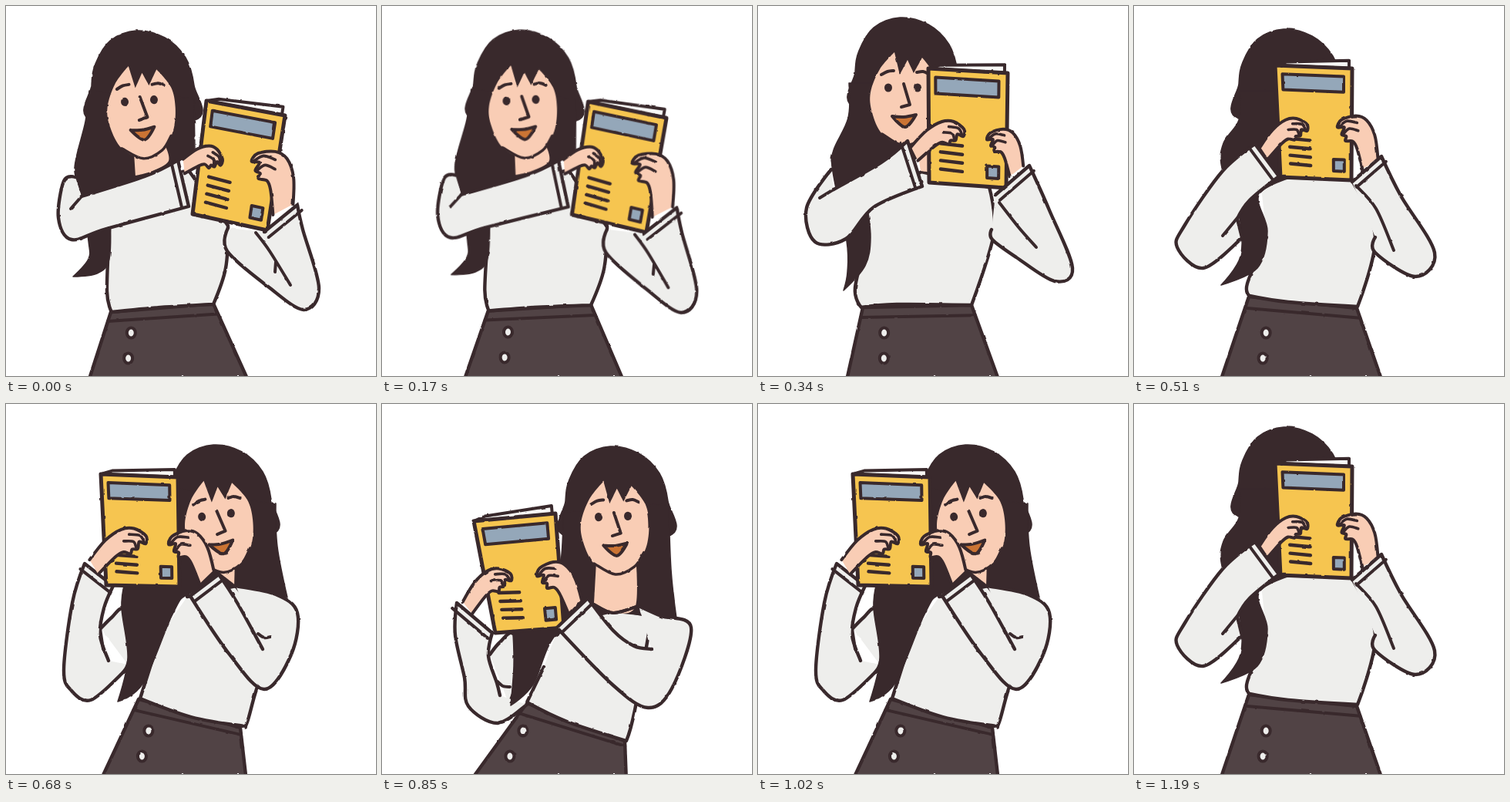
These frames come from a looping animation (480 by 480 pixels, 1360 ms). An HTML page:

```html
<!DOCTYPE html>
<html lang="en">
<head>
<meta charset="utf-8">
<title>Woman with a book</title>
<style>
html, body { margin: 0; width: 100%; height: 100%; overflow: hidden; background: #fff; }
svg { display: block; width: 100vw; height: 100vh; }
path { stroke-linecap: round; stroke-linejoin: round; }
</style>
</head>
<body>
<svg viewBox="0 0 480 480">
  <filter id="rough" filterUnits="userSpaceOnUse" x="0" y="0" width="480" height="480" color-interpolation-filters="sRGB">
    <feTurbulence type="fractalNoise" baseFrequency=".12" seed="4"/>
    <feDisplacementMap in="SourceGraphic" scale="2.4" xChannelSelector="R" yChannelSelector="G"/>
  </filter>
  <g id="scene" filter="url(#rough)"></g>
</svg>
<script>
const INK = '#39292c', SKIN = '#f9cdb5', CLOTH = '#eeeeec', SKIRT = '#514345',
      GOLD = '#f6c550', BLUE = '#94a7b9', LIPS = '#cb7434', PAPER = '#f7f7f5', FRAME = 170;

const mix = (a, b, t) => a.map((v, k) => v + (b[k] - v) * t);
const corner = p => p.map(v => v.toFixed(1)) + '!';

// Smooth path through "x,y" points; "!" marks a corner, "/" starts a new stroke.
function trace(text, closed) {
  return text.split('/').map(part => {
    const pts = part.trim().split(/\s+/).map(s => ({ p: s.replace('!', '').split(',').map(Number), hard: s.endsWith('!') }));
    const n = pts.length;
    const at = i => pts[closed ? (i + n) % n : Math.max(0, Math.min(n - 1, i))];
    const handle = (i, sign) => at(i).p.map((c, k) =>
      at(i).hard ? c : c + sign * (at(i + 1).p[k] - at(i - 1).p[k]) / 6);
    let d = 'M' + pts[0].p;
    for (let i = 0; i < n - !closed; i++)
      d += `C${handle(i, 1)} ${handle(i + 1, -1)} ${at(i + 1).p}`;
    return d;
  }).join('');
}
const shape = (d, fill, width = 4.4, closed = false) =>
  `<path d="${trace(d, closed)}" fill="${fill}" stroke="${INK}" stroke-width="${width}"/>`;
const line = (d, width = 4) => shape(d, 'none', width);
const hair = d => shape(d, INK, 1.5, true);
const skin = d => shape(d, SKIN, 0, true);
const cloth = d => shape(d, CLOTH);
const dot = (x, y, rx, ry, fill, width) =>
  `<ellipse cx="${x}" cy="${y}" rx="${rx}" ry="${ry}" fill="${fill}" stroke="${INK}" stroke-width="${width}"/>`;
const place = (x, y, angle, art) => `<g transform="translate(${x} ${y}) rotate(${angle})">${art}</g>`;

// Head parts are drawn around the point between the eyes.
const dome = (x, y) =>
  place(x, y, 0, hair('-62,25 -62,-20 -57,-48 -38,-78 -4,-91 33,-82 60,-56 71,-20 72,25'));

const face = (x, y, tilt) => place(x, y, tilt,
  skin('-42,6 -40,32 -27,60 0,75 25,66 41,42 46,12 42,-15 25,-39! 14,-19! 6,-36! -4,-17! -11,-46! -30,-24') +
  line('-27,60 0,75 25,66 38,48', 3.4) +
  dot(-19, 0, 5, 5.6, INK, 0) + dot(19, 0, 5, 5.6, INK, 0) +
  line('-28,-17 -20,-21 -12,-22 / 18,-20 26,-21 33,-18') +
  line('1,-5 9,22! -2,25') +
  shape('-14,37! 1,38 17,35! 3,51', LIPS, 4, true));

function skirt(left, right, hemLeft, hemRight, inset) {
  const l = [hemLeft, 490], r = [hemRight, 490];
  let art = shape([left, right, r, l].map(corner).join(' '), SKIRT, 4.4, true) +
    line(corner(mix(left, l, .13)) + corner(mix(right, r, .13)).padStart(20));
  for (const i of [0, 1]) {
    const y = 424 + i * 33, x = mix(left, l, (y - left[1]) / (490 - left[1]))[0];
    art += dot(x + inset + i * 7, y, 5.5, 6.5, CLOTH, 4);
  }
  return art;
}

// Corners run clockwise from top left; details sit at fractions of the cover.
function book(a, b, c, d) {
  const at = (u, v) => corner(mix(mix(a, b, u), mix(d, c, u), v));
  const quad = (u, v, u2, v2) => [at(u, v), at(u2, v), at(u2, v2), at(u, v2)].join(' ');
  let art = shape([at(0, 0), at(.15, -.035), at(.96, -.07), at(.96, 0)].join(' '), PAPER, 4, true) +
    shape(quad(0, 0, 1, 1), GOLD, 5, true) +
    shape(quad(.09, .075, .89, .215), BLUE, 4, true) +
    shape(quad(.75, .82, .9, .925), BLUE, 4, true);
  for (let v = .65; v < .9; v += .075) art += line(at(.15, v) + ' ' + at(.43, v + .01), 4.4);
  return art;
}

// A gripping hand reaching from the wrist to the fingertips; side is +1 or -1.
function hand(x, y, tipX, tipY, side, bulge = 1) {
  const dx = (tipX - x) / 68, dy = (tipY - y) / 68;
  const put = text => text.replace(/(-?\d+),(-?\d+)/g, (_, u, v) => {
    v *= side * bulge;
    return [x + u * dx - v * dy, y + u * dy + v * dx].map(n => n.toFixed(1));
  });
  let art = shape(put('0,13! 26,30 48,35 62,28 71,10 67,-1 61,6 56,-3 50,0 46,-5 39,2 28,0 2,-13!'), SKIN, 4);
  for (const i of [0, 1])
    art += line(put(`${66 - i * 11},${1 - i} ${65 - i * 10},${14 - i * 4} ${54 - i * 9},${23 - i * 6}`), 3.6);
  return art;
}

// A sleeve outline passes the cuff edge from (x2,y2) to (x1,y1); a hem line runs beside it.
function sleeve(before, x1, y1, x2, y2, after, folds) {
  const k = 9 / Math.hypot(x2 - x1, y2 - y1), nx = (y1 - y2) * k, ny = (x2 - x1) * k;
  return cloth(`${before} ${x2},${y2}! ${x1},${y1}! ${after}`) +
    line(`${x1 + nx},${y1 + ny} ${x2 + nx},${y2 + ny}`) + line(folds);
}

const low =
  skirt([136, 397], [269, 386], 106, 316, 35) +
  cloth('150,240! 236,212! 288,285! 285,340 269,387! 200,391 137,397! 131,370 134,290') +
  dome(173, 123) +
  hair('108,110! 244,120! 245,186! 135,270! 134,328 118,347 87,351! 107,328 107,305 98,246 89,210 103,150') +
  skin('166,190! 206,180! 211,201 190,214 168,220!') +
  face(173, 123, -4) +
  book([260, 123], [362, 142], [339, 291], [242, 270]) +
  hand(230, 208, 279, 206, 1 * -1) + hand(360, 265, 319, 200, 1) +
  sleeve('90,222! 75,227 68,275 85,303 130,289', 223, 200, 237, 260, '180,221 98,247', '98,247 84,263') +
  sleeve('288,288! 287,318 340,364 386,394 406,366 385,290', 335, 293, 378, 258, '',
    '324,294 342,318 369,362 / 350,332 349,345');

const peekRight =
  skirt([136, 391], [277, 388], 114, 314, 35) +
  cloth('140,260! 212,215! 300,235! 306,295 277,388! 180,387 134,391! 126,365 144,295') +
  dome(188, 106) +
  hair('118,100! 230,100! 215,190! 140,250! 146,300 139,337 111,369! 116,345 115,305 97,215 98,187 117,145') +
  skin('204,170! 226,170! 226,216! 211,214!') +
  face(188, 106, 0) +
  book([221, 81], [324, 87], [322, 236], [222, 229]) +
  hand(202, 192, 267, 168, -1, .75) + hand(336, 215, 297, 172, 1) +
  sleeve('95,212! 63,262 74,306 114,302 150,261', 194, 175, 213, 234, '160,203 98,238', '98,238 80,249') +
  sleeve('303,290! 304,303 335,326 385,357 408,340 378,265', 308, 245, 352, 207, '', '313,255 338,287 361,313');

const hidden =
  skirt([149, 377], [289, 392], 111, 323, 38) +
  cloth('165,235 190,222! 282,225! 313,300 290,390! 200,384 150,376! 147,360 172,300') +
  dome(198, 121) +
  hair('137,110! 230,110! 205,222! 162,245 173,292 160,340 113,362! 138,325 136,270 114,210 116,178 136,148') +
  book([183, 77], [283, 81], [282, 226], [190, 222]) +
  hand(168, 191, 225, 161, -1, .75) + hand(307, 205, 264, 156, 1) +
  sleeve('140,300! 134,276! 150,252', 157, 179, 188, 221, '115,214 66,284 56,313 90,340 139,302', '134,275 115,298') +
  sleeve('313,300! 313,320 365,351 390,320 346,246', 283, 228, 321, 195, '', '288,233 314,263 337,317');

const peekLeft =
  skirt([172, 383], [304, 420], 122, 312, 32) +
  cloth('235,250! 298,236! 350,300! 325,370 312,415 303,417 240,406 174,382! 200,300') +
  cloth('123,291 137,277 152,266 165,300 158,338') +
  sleeve('133,333 122,300 127,265', 102, 207, 139, 236, '86,258 75,345 85,372 110,384 150,350 158,338', '122,291 126,318') +
  dome(273, 144) +
  hair('225,110! 350,130! 352,185 365,251! 298,236! 238,246 216,273 178,362 145,386! 158,330 150,265 154,232! 225,220!') +
  skin('269,200! 300,195! 299,236! 276,218!') +
  line('299,203 298,237') + face(273, 144, -7) +
  book([123, 91], [223, 95], [225, 237], [130, 235]) +
  hand(113, 212, 182, 180, -1, .75) + hand(261, 225, 211, 181, 1) +
  sleeve('333,318 300,258', 239, 249, 276, 221, '290,325 335,370 370,325 378,271 350,247 298,236', '327,298 335,303 343,302');

const lowLeft =
  skirt([188, 388], [315, 437], 114, 317, 21) +
  cloth('225,300! 278,262! 350,275! 328,397 317,437! 240,412 188,387! 210,341') +
  cloth('140,325 152,310 170,298 180,340 165,390') +
  sleeve('153,378 149,362 138,327', 97, 258, 143, 297, '95,300 107,355 112,392 150,414 188,390', '150,360 157,366 166,367') +
  dome(300, 146) +
  hair('235,140! 372,130! 375,215 382,278! 300,270! 228,297 196,364 167,391! 171,340 170,298! 225,240') +
  skin('278,205! 329,195! 329,262 302,271 275,260!') +
  line('275,260 300,271 333,262') + face(300, 146, -2) +
  book([119, 152], [225, 142], [236, 290], [147, 297]) +
  hand(110, 265, 168, 228, -1, .75) + hand(251, 263, 201, 222, 1) +
  sleeve('350,318 327,314 300,294', 227, 290, 267, 252, '300,365 345,394 376,369 401,290 362,275 333,262', '275,260 300,271 333,262');

const lean = `<g transform="rotate(1.2 210 480)">${low}</g>`;
const order = [low, lean, peekRight, hidden, peekLeft, lowLeft, peekLeft, hidden];
const scene = document.getElementById('scene');

let shown = -1;
function draw() {
  const step = Math.floor(performance.now() / FRAME) % order.length;
  if (step !== shown) scene.innerHTML = order[shown = step];
  requestAnimationFrame(draw);
}
draw();
</script>
</body>
</html>
```
